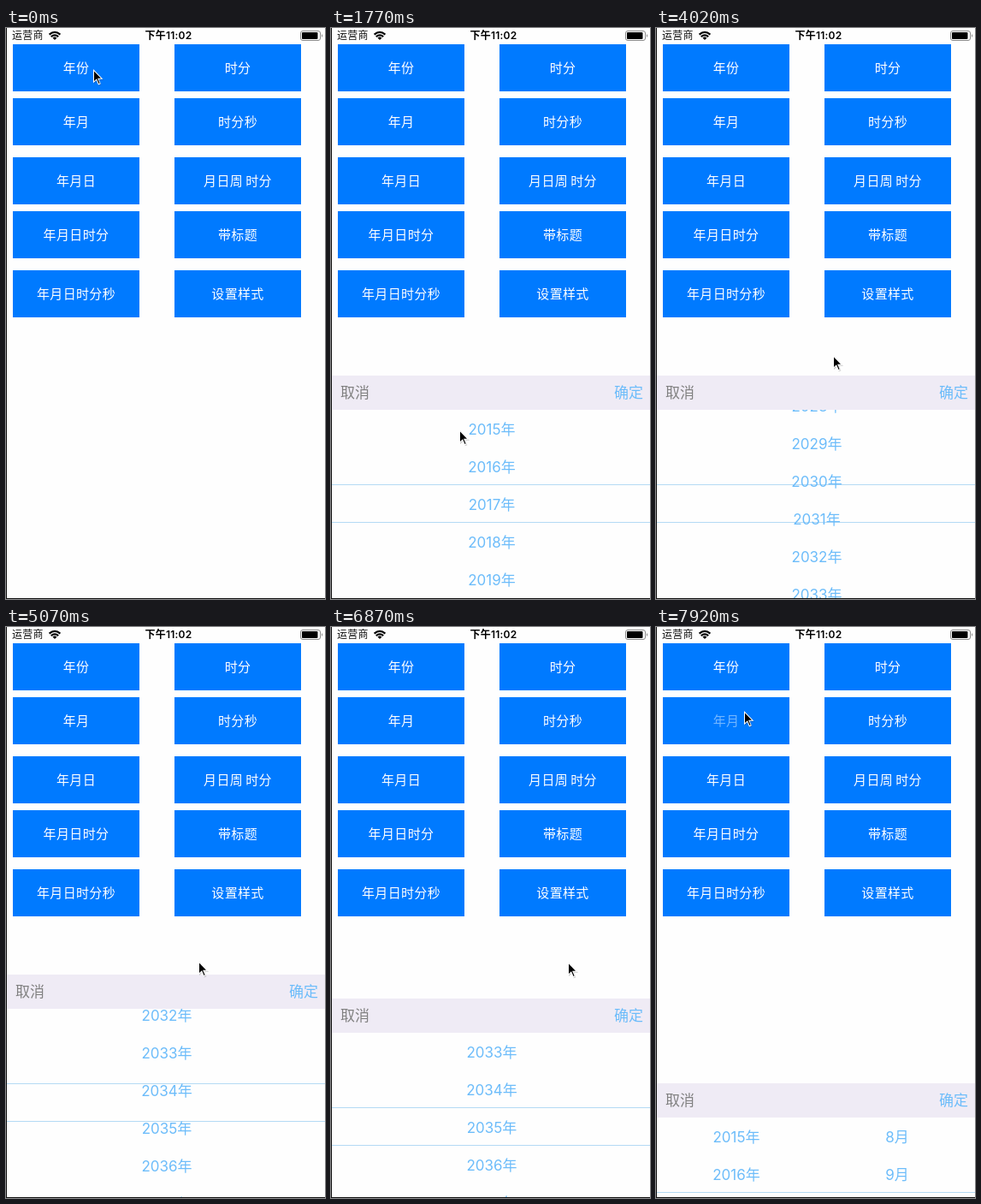
These frames come from a looping animation (373 by 667 pixels, 8 s). An HTML page:

```html
<!DOCTYPE html>
<html lang="zh-CN">
<head>
<meta charset="utf-8">
<title>日期选择器</title>
<style>
  html, body { margin: 0; width: 100%; height: 100%; overflow: hidden; background: #fff; }
  body { font-family: Inter, "Noto Sans CJK SC", "Noto Sans CJK JP", "Noto Sans CJK", sans-serif; }
  #stage { position: relative; width: 373px; height: 667px; overflow: hidden; background: #fefefe; }
  #stage * { position: absolute; white-space: nowrap; }
  .carrier { left: 7px; top: 0; font-size: 12px; line-height: 18px; letter-spacing: .2px; color: #111; }
  .time { left: 140px; width: 100px; top: 0; text-align: center; font-size: 12px; line-height: 18px; letter-spacing: .2px; font-weight: 600; color: #000; }
  .status { left: 0; top: 0; }
  .btn { width: 148px; height: 55px; background: #007aff; }
  .btn span { inset: 0; text-align: center; color: #fff; font-size: 15px; line-height: 55px; letter-spacing: .35px; word-spacing: -1.5px; }
  #sheet { left: 0; top: 0; width: 373px; height: 261px; overflow: hidden; background: #fefefe; }
  .line { left: 0; width: 373px; height: 1px; background: #b4daf4; }
  .bar { left: 0; top: 0; width: 373px; height: 40px; background: #efebf5; font-size: 17px; line-height: 40px; }
  .cancel { left: 11px; color: #808080; }
  .ok { right: 8px; color: #6cbcfa; }
  .row { top: 0; width: 100px; text-align: center; font-size: 17px; line-height: 44px; color: #6cbcfa; }
  .edge { left: 0; top: 0; width: 1px; height: 667px; background: #111; }
  .edge.bottom { top: 666px; width: 373px; height: 1px; }
  #cursor { left: 0; top: 0; overflow: visible; }
</style>
</head>
<body>
<div id="stage">
  <div class="carrier">运营商</div>
  <div class="time">下午11:02</div>
  <svg class="status" width="373" height="18">
    <path d="M50.6 7.7Q57 2.1 63.4 7.7M52.8 10.1Q57 6.5 61.2 10.1" fill="none" stroke="#000" stroke-width="2.2"/>
    <path d="M54.5 11.4Q57 9.4 59.5 11.4L57 14Z"/>
    <rect x="344.5" y="3.5" width="23" height="11" rx="2.5" fill="none" stroke="#888"/>
    <rect x="346" y="5" width="18.5" height="8" rx="1"/>
    <path d="M369 7Q371 9 369 11Z" fill="#777"/>
  </svg>
  <div id="sheet">
    <div class="line" style="top:127px"></div>
    <div class="line" style="top:171px"></div>
    <div class="bar"><span class="cancel">取消</span><span class="ok">确定</span></div>
  </div>
  <div class="edge"></div>
  <div class="edge bottom"></div>
  <svg id="cursor" width="13" height="20">
    <path d="M1 1V17L4.4 14 6.8 19.3 9.4 18.2 7.2 12.8H12Z" opacity=".2"/>
    <path d="M0 0V16.2L3.7 12.9 6 18.4 8.8 17.2 6.5 11.8H11.4Z" fill="#fff"/>
    <path d="M1 2.4V13.9L4 11.2 6.5 17 7.6 16.5 5.1 10.7H9Z"/>
  </svg>
</div>
<script>
const LOOP = 8000, ROW = 44, SHEET = 261, SLIDE = 300;
const OPEN = 199, DRAG = 2520, FLICK = 3120, REST = 6120, CLOSE = 6772, REOPEN = 7829;

const stage = document.getElementById('stage');
const sheet = document.getElementById('sheet');
const cursor = document.getElementById('cursor');
const bar = sheet.querySelector('.bar');

function add(tag, className, parent, before = null) {
  const el = document.createElement(tag);
  el.className = className;
  return parent.insertBefore(el, before);
}

const labels = [
  ['年份', '年月', '年月日', '年月日时分', '年月日时分秒'],
  ['时分', '时分秒', '月日周 时分', '带标题', '设置样式']
];
const [[yearText, monthText]] = labels.map((column, c) => column.map((text, i) => {
  const btn = add('div', 'btn', stage, sheet);
  btn.style.left = 8 + c * 189 + 'px';
  btn.style.top = 19 + i * 63 + Math.floor(i / 2) * 6 + 'px';
  const span = add('span', '', btn);
  span.textContent = text;
  return span;
}));

const makeRows = () => Array.from({ length: 7 }, () => add('div', 'row', sheet, bar));
const years = makeRows(), months = makeRows();

const progress = (t, start, length) => Math.min(1, Math.max(0, (t - start) / length));
const easeInOut = u => u < .5 ? 4 * u ** 3 : 1 - 4 * (1 - u) ** 3;

// Cursor gestures: start, duration, x, y
const moves = [
  [1330, 520, 151, 475],
  [2070, 450, 172, 452],
  [DRAG, 600, 184, 494],
  [FLICK, 450, 207, 382],
  [4170, 900, 225, 390],
  [5220, 900, 246, 390],
  [6420, 150, 277, 391],
  [6870, 600, 118, 60],
  [7470, 300, 103, 98]
];

function cursorAt(t) {
  let x = 102, y = 48;
  for (const [start, length, toX, toY] of moves) {
    const u = easeInOut(progress(t, start, length));
    x += (toX - x) * u;
    y += (toY - y) * u;
  }
  return [x, y];
}

// Share of the sheet that is below the screen edge
function hiddenAt(t) {
  if (t >= REOPEN) return (1 - progress(t, REOPEN, SLIDE)) ** 2;
  if (t >= CLOSE) return progress(t, CLOSE, SLIDE) ** 2;
  return (1 - progress(t, OPEN, SLIDE)) ** 2;
}

// The wheel follows the drag, then coasts to a stop after the flick
function yearAt(t) {
  if (t >= REOPEN) return 2017;
  if (t >= REST) return 2035;
  const dragged = 2017 - 52 / ROW * easeInOut(progress(t, DRAG, FLICK - DRAG));
  const n = Math.max(0, t - FLICK) / 150;
  return 2035 - (2035 - dragged) * (1 + .095 * n) * Math.exp(-.3211 * n);
}

const textAlpha = (t, press) => t < press ? 1 : .45 + .55 * progress(t, press, 440);

function spin(rows, center, left, unit) {
  const first = Math.round(center) - 3;
  rows.forEach((row, i) => {
    row.textContent = first + i + unit;
    row.style.left = left + 'px';
    row.style.transform = `translateY(${Math.round(129 + (first + i - center) * ROW)}px)`;
  });
}

// The picture is refreshed about every 150 ms
function snap(t) {
  if (t < 290) return 0;
  const [from, step] = t < 1770 ? [290, 148] : [1770, 150];
  return from + Math.floor((t - from) / step) * step;
}

function draw(t) {
  const [x, y] = cursorAt(t).map(Math.round);
  const second = t >= REOPEN;
  cursor.style.transform = `translate(${x}px,${y}px)`;
  sheet.style.transform = `translateY(${Math.round(406 + SHEET * hiddenAt(t))}px)`;
  spin(years, yearAt(t), second ? 44 : 138, '年');
  spin(months, 10, 232, '月');
  months.forEach(row => row.style.visibility = second ? 'visible' : 'hidden');
  yearText.style.opacity = textAlpha(t, 290);
  monthText.style.opacity = textAlpha(t, 7920);
}

const start = performance.now();
let shown = -1;
function tick() {
  const t = snap((performance.now() - start) % LOOP);
  if (t !== shown) draw(shown = t);
  requestAnimationFrame(tick);
}
tick();
</script>
</body>
</html>
```
